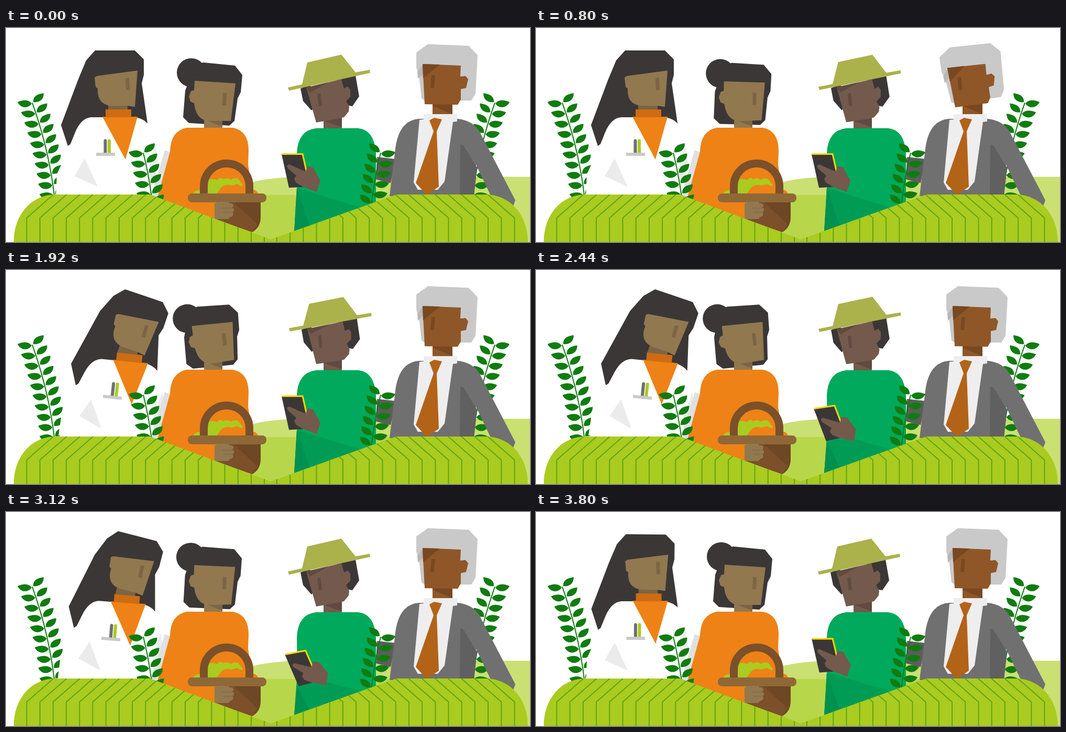
An HTML page that plays this animation: 1000 by 410 pixels, repeating every 3.84 s.

```html
<!DOCTYPE html>
<html lang="en">
<head>
<meta charset="utf-8">
<title>Four people behind a field</title>
<style>
  html, body { margin: 0; width: 100%; height: 100%; overflow: hidden; background: #fff; }
  svg { display: block; width: 100%; height: 100%; }
  .leaf { fill: #107c10; }
  .stem { fill: none; stroke: #107c10; stroke-width: 2; }
  .hair { fill: #3b3737; }
  .skin { fill: #92784f; }
  .skinShade { fill: #7b6544; }
  .skin3 { fill: #735a4d; }
  .skin3Shade { fill: #614a3f; }
  .skin4 { fill: #8f5728; }
  .skin4Shade { fill: #784820; }
</style>
</head>
<body>
<svg viewBox="0 0 1000 410">
  <defs>
    <clipPath id="fieldClip"><use href="#field"/></clipPath>
  </defs>

  <!-- hills -->
  <path fill="#cae073" d="M430 312C460 293 500 287 560 285H1000V410H430Z"/>
  <path fill="#b8d64a" d="M430 320H900V410H430Z"/>
  <g id="backPlants"></g>

  <!-- man with tie -->
  <path fill="#5e5c5d" d="M708 247L744 251L734 297L706 290Z"/>
  <path fill="#707070" d="M732 322L742 240Q747 177 788 174H862Q891 177 904 199L972 330L966 346L925 321L897 262L893 322Z"/>
  <path fill="#606060" d="M867 223L873 225L899 268L893 322H866Z"/>
  <path class="skin4" d="M814 138H852V168H814Z"/>
  <path class="skin4Shade" d="M814 138H852V165L814 149Z"/>
  <path fill="#eeeeee" d="M797 165H861V179L853 180L837 294L824 310H786L778 296L789 176L797 175Z"/>
  <path fill="#b36318" d="M808 177L817 172L832 175L822 198L826 304L803 320L782 297L816 198Z"/>
  <g id="head4">
    <path fill="#c9c9c9" d="M805 31L883 34L900 52L896 126L888 139H860L850 75L799 80V139L793 135L788 90L783 76V47Z"/>
    <path fill="#b7b7b7" d="M796 69V88L786 97L785 84Z"/>
    <path class="skin4" d="M795 69L868 72L867 93L877 92L882 98L878 115L868 117V137L862 147L799 146Z"/>
    <path class="skin4Shade" d="M795 69L828 70L796 96ZM812 90H819L817 115H810Z"/>
  </g>

  <!-- woman in white coat -->
  <polygon class="hair" id="hair1"/>
  <g id="head1">
    <path class="skinShade" d="M195 145H232V166H195Z"/>
    <path class="skin" d="M169 95L173 92L251 81.500L246 151L232 149H200Q176 146 175 122V116L171 113Z"/>
    <path class="skinShade" d="M228 96L235 95L236 119H229Z"/>
  </g>
  <g id="body1">
    <path fill="#fff" d="M162 171H245Q262 173 271 184L300 260V325H95L97 280L115 242L132 200Q143 173 162 171Z"/>
    <path fill="#ebebeb" d="M150 250L175 304L131 284ZM284 222L291 262L276 310L272 270Z"/>
    <path fill="#ee8216" d="M184 170H251L228 252Z"/>
    <path fill="#cd6c13" d="M190 156H239V171H190Z"/>
    <rect x="186.500" y="213" width="6" height="30" rx="3" fill="#707070"/>
    <rect x="194" y="213" width="6" height="30" rx="3" fill="#aacb20"/>
    <path fill="#cacaca" d="M172 239H208V245H172Z"/>
  </g>
  <path fill="#e0e0e0" d="M303 234L316 239L298 324H276Z"/>

  <!-- woman with basket -->
  <g id="hairBack2">
    <circle class="hair" cx="353.500" cy="85.500" r="27.500"/>
    <path class="hair" d="M360 72L376 66L437 72L451 90L448 123L442 135L436 178L426 187L349 182L338 171L342 120Z"/>
  </g>
  <path class="skin" d="M378 170H413V193H378Z"/>
  <path class="skinShade" d="M378 170H413V189L380 176Z"/>
  <g id="face2">
    <path class="skin" d="M360 101L438 106L429 178L410 178H384Q362 174 359 144L352 141L349 131L353 121L359 119Z"/>
    <path class="skinShade" d="M414 124L421 125L420 148H413Z"/>
  </g>
  <path fill="#ee8216" d="M345 191H433Q463 197 463 235L462 262L468 300V391L400 367L288 328L313 237Q314 197 345 191Z"/>
  <path fill="#aacb20" d="M384 320V297Q386 288 394 289L403 291Q409 284 415 290Q422 285 429 291Q437 285 444 290L452 301L449 303L441 299L430 302Q416 298 409 308L400 320ZM357 318Q360 309 372 311V319Z"/>
  <path fill="#ee8216" d="M468 310Q478 308 482 319H468Z"/>
  <path fill="#6e4724" d="M425 333H486V362Q486 382 470 391L398 366Z"/>
  <path fill="#7b502a" d="M424 333H434L480 376L470 391L398 366Z"/>
  <path fill="none" stroke="#7b502a" stroke-width="15" d="M377.500 320V303A43.500 43.500 0 0 1 464.500 303V320"/>
  <rect x="347" y="317" width="150" height="17" rx="8" fill="#8f6837"/>
  <path class="skin" d="M398 336L408 333H424L427 336H431Q438 341 430 345H434Q437 350 432 353H433Q436 360 428 362L424 366H398Z"/>
  <path fill="none" stroke="#7b6544" d="M412 345H430M415 353H432"/>

  <!-- man with hat -->
  <path class="skin3" d="M606 160H641V194H606Z"/>
  <path class="skin3Shade" d="M606 160H641V190L606 178Z"/>
  <g id="head3">
    <path class="hair" d="M562 116L580 108L590 150L583 158L567 140ZM630 98L667 91L674 131L661 150L650 148Z"/>
    <path class="skin3" d="M573 114L640 98L645 116L652 112L657 118V132L649 140L655 151L654 160L645 171L632 174L592 181L586 160Z"/>
    <path class="skin3Shade" d="M573 114L615 104L580 124ZM594 127L600 125L603 149L597 150Z"/>
    <path fill="#abb14b" d="M538 114L565 108L575 66L640 51L667 85L694 80L695 86L540 120Z"/>
  </g>
  <path fill="#00a95b" d="M555 240Q557 196 592 192H672Q703 195 706 240V350L550 390L556 305Z"/>
  <polygon id="sleeveShade" fill="#009c55"/>
  <polygon id="sleeveDark" fill="#009150"/>
  <g id="arm">
    <path class="hair" d="M526 242L566 241L580 304L540 306Z"/>
    <path fill="none" stroke="#fed700" stroke-width="3" d="M527 241.500H566L573.500 275"/>
    <path class="skin3" d="M536 264L540 261L562 271L572 275L575 265L586 267L600 292L593 314L566 304L553 296L550 289L554 283L538 269Z"/>
  </g>

  <g id="frontPlants"></g>
  <path id="field" fill="#aacb20" d="M15 410C15 358 48 319 95 319H275L505 405L745 319H915C962 319 996 358 996 410Z"/>
  <path id="stripes" clip-path="url(#fieldClip)" fill="none" stroke="#5fa611" stroke-width="2"/>
</svg>

<script>
const LOOP = 3840;
const $ = id => document.getElementById(id);

// Plants: pairs of leaves along a gently bending stem.
function plant(x, y, lean, count) {
  let stem = '', leaves = '';
  for (let i = 0; i < count; i++) {
    const nx = x + lean * i - 0.26 * i * i, ny = y + 19.6 * i;
    stem += `${i ? 'L' : 'M'}${nx} ${ny}`;
    leaves += `M${nx - 1} ${ny + 2}c-5-8-17-8-27-3c6 12 20 13 27 3z`
            + `M${nx + 2} ${ny - 1}c-1-11 8-16 20-17c0 14-10 18-20 17z`;
  }
  return `<path class="stem" d="${stem}"/><path class="leaf" d="${leaves}"/>`;
}
const mirrored = (sum, shape) => `<g transform="translate(${sum}) scale(-1 1)">${shape}</g>`;
const tall = plant(50, 143, 7, 10), low = plant(262, 239, 4.8, 6);
$('backPlants').innerHTML = tall + mirrored(983, tall);
$('frontPlants').innerHTML = low + mirrored(977, low);

// Furrows mirrored around the dip of the field.
let furrows = '';
for (let i = 0; i < 19; i++) {
  const x = 39.5 + 25.2 * i;
  furrows += `M${x} 410V364l51 -45M${1010 - x} 410V364l-51 -45`;
}
$('stripes').setAttribute('d', furrows);

const ease = (t, start, end) => {
  const u = Math.min(1, Math.max(0, (t - start) / (end - start)));
  return u * u * (3 - 2 * u);
};
const rotate = (id, angle, [x, y]) => $(id).setAttribute('transform', `rotate(${angle} ${x} ${y})`);
const turn = ([x, y], angle, [cx, cy]) => {
  const a = angle * Math.PI / 180, c = Math.cos(a), s = Math.sin(a);
  return [cx + (x - cx) * c - (y - cy) * s, cy + (x - cx) * s + (y - cy) * c];
};

const COAT_PIVOT = [178, 372], HEAD1_PIVOT = [217, 213], HEAD2_PIVOT = [396, 137];
const hairTop = [[138, 98], [153, 62], [170, 43], [246, 43], [263, 60], [263, 90], [259, 106]];
const hairEnds = [[270, 182], [250, 205], [140, 210], [118, 226], [105, 186]];

function draw(t) {
  const lean = ease(t, 880, 1920) - ease(t, 2760, 3920);
  const coatAngle = 5.8 * lean, headAngle = 18.8 * lean;
  rotate('body1', coatAngle, COAT_PIVOT);
  rotate('head1', headAngle, HEAD1_PIVOT);
  $('hair1').setAttribute('points', [
    ...hairTop.map(p => turn(p, headAngle, HEAD1_PIVOT)),
    ...hairEnds.map(p => turn(p, coatAngle, COAT_PIVOT))
  ].join(' '));

  const tilt2 = -9.3 * (ease(t, 580, 1300) - ease(t, 2500, 3300));
  rotate('hairBack2', tilt2, HEAD2_PIVOT);
  rotate('face2', tilt2, HEAD2_PIVOT);

  const nod = 0.5 * ease(t, 200, 800) + 0.5 * ease(t, 1280, 1900) - ease(t, 2120, 2800);
  rotate('head3', 1.7 * nod, [620, 181]);

  const drop = ease(t, 1880, 2700) - ease(t, 3160, 3900);
  rotate('arm', -11 * drop, [693, 225]);
  const cuff = 306 + 26 * drop;
  $('sleeveShade').setAttribute('points', `555,${cuff} ${580 + 30 * drop},${314 + 11 * drop} 690,348 580,380 550,390`);
  $('sleeveDark').setAttribute('points', `555,${cuff} 580,380 550,390`);

  rotate('head4', -8.3 * (ease(t, 0, 560) - ease(t, 840, 1720)), [841, 142]);
}

function tick() {
  draw(performance.now() % LOOP);
  requestAnimationFrame(tick);
}
tick();
</script>
</body>
</html>
```
